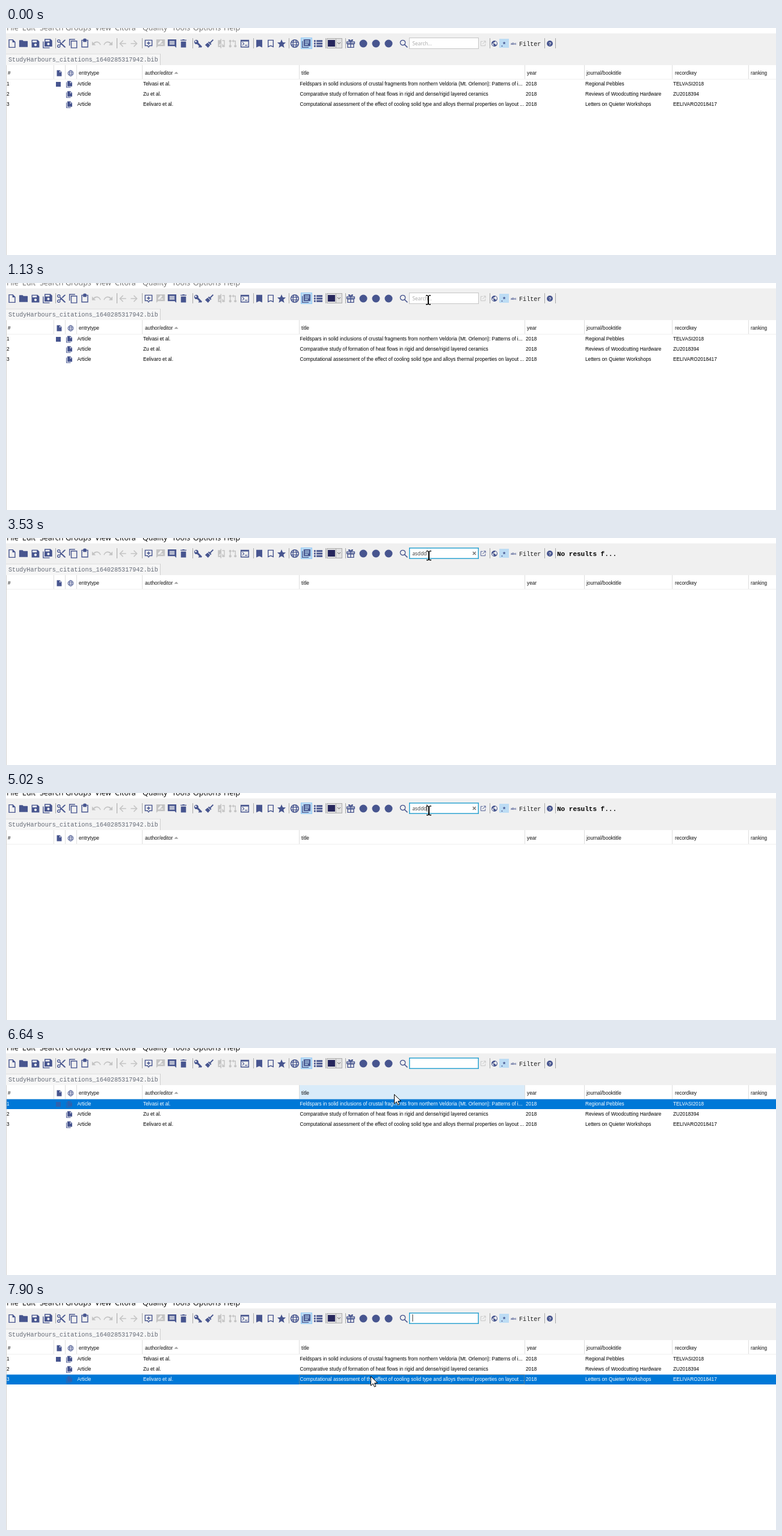
These frames come from a looping animation (1280x379 px, 7990 ms). An HTML page with a canvas:

```html
<!DOCTYPE html>
<html lang="en">
<head>
<meta charset="utf-8">
<title>Reference table search</title>
<style>
html, body { margin: 0; width: 100%; height: 100%; overflow: hidden; background: #fff; }
canvas { display: block; width: 1280px; height: 379px; }
</style>
</head>
<body>
<canvas id="stage" width="1280" height="379"></canvas>
<script>
const ctx = document.getElementById('stage').getContext('2d');
const LOOP = 7990;
const INK = '#47558f', DIM = '#c4c4c4';
const SANS = '8.25px "Liberation Sans", Arial, sans-serif';
const FIELD = '8.3px "Open Sans", sans-serif';
const MENU = '12.5px "Open Sans", sans-serif';
const MONO = '10.12px "Liberation Mono", monospace';

// Icon outlines on a 24 unit grid, filled even-odd
const SHAPES = {
  file: 'M4 2h10l6 6v14H4z M6 4v16h12V9h-5V4z',
  folder: 'M2 5a1 1 0 0 1 1-1h7l2 2h9a1 1 0 0 1 1 1v13H2z',
  save: 'M3 3h14l4 4v14H3z M5 5v4h10V5z M12 12a3 3 0 1 0 .01 0z',
  saveAll: 'M5 1h14l4 4v14H5z M7 3v4h10V3z M14 10a3 3 0 1 0 .01 0z M1 7h2v14h14v2H1z',
  cut: 'M19 3l-6 6 2 2 7-7V3z M6 2a4 4 0 1 0 .01 0z M6 4a2 2 0 1 1-.01 0z M6 14a4 4 0 1 0 .01 0z M6 16a2 2 0 1 1-.01 0z M9 7l13 13v1h-3l-7-7-3 3-1.500-2.500L10 12 7.500 9.500z',
  copy: 'M6 5h15v18H6z M8 7v14h11V7z M2 1h14v2H4v14H2z',
  paste: 'M4 3h4a4 3 0 0 1 8 0h4v18H4z M6 5v14h12V5h-2v3H8V5z',
  undo: 'M13 7C9 7 7 9 5.500 10.500L2 7v9h9l-3.600-3.600C9 11 11 9.500 13 9.500c4 0 7 2.500 8 6l2-.7C21.500 10.500 18 7 13 7z',
  back: 'M20 11H8l5.500-5.500L12 4l-8 8 8 8 1.500-1.500L8 13h12z',
  add: 'M3 3h18v15h-6l-3 4-3-4H3z M5 5v11h5l2 3 2-3h5V5z M11 7h2v3h3v2h-3v3h-2v-3H8v-2h3z',
  edit: 'M2 2h20v16H6l-4 4z M6 14h3l7-7-3-3-7 7z M11 14h7v-2h-5z',
  note: 'M2 2h20v20l-4-4H2z M6 6h12v2H6z M6 9h12v2H6z M6 12h12v2H6z',
  trash: 'M6 7h12v14H6z M5 3h4l1-1h4l1 1h4v2H5z',
  key: 'M22 19l-3 3-2-2-2 2-2-2 2-2-5-5a5 5 0 1 1 3-3z M7 5a2 2 0 1 0 .01 0z',
  broom: 'M20 2l2 2-7 7 2 2-2 2-6-6 2-2 2 2z M8 10l6 6-5 6-7-7z',
  compare: 'M10 1h2v22h-2v-3H4V4h6z M6 17h4v-6z M14 4h6v16h-6v-8l4 5V6h-4z',
  merge: 'M6 3a3 3 0 0 1 1 5.800v6.400a3 3 0 1 1-2 0V8.800A3 3 0 0 1 6 3z M18 15a3 3 0 1 1-.1 0z M17 15V7h-3v3l-4-4 4-4v3h5v10z',
  shell: 'M2 3h20v18H2z M4 7v12h16V7z M6 9l1-1 4 4.500L7 17l-1-1 3-3.500z M12 15h6v2h-6z',
  mark: 'M5 3h14v18l-7-3-7 3z',
  markLine: 'M5 3h14v18l-7-3-7 3z M7 5v13l5-2 5 2V5z',
  star: 'M12 2l3 7 7 .5-5.500 5 2 7.500-6.500-4-6.500 4 2-7.500L2 9.500 9 9z',
  shelf: 'M2 6h2v14h14v2H2z M6 2h16v16H6z M9 5h10v2H9z M9 9h10v2H9z M9 13h7v2H9z',
  list: 'M2 4h4v4H2z M8 4h14v4H8z M2 10h4v4H2z M8 10h14v4H8z M2 16h4v4H2z M8 16h14v4H8z',
  gift: 'M2 7h20v6H2z M4 9v2h7V9z M13 9v2h7V9z M4 13h16v9H4z M6 14v6h5v-6z M13 14v6h5v-6z M12 7C7 7 5 4 7 2.500s5 1 5 3c0-2 3-4.500 5-3s0 4.500-5 4.500z',
  doc: 'M4 2h10l6 6v14H4z M13 4v5h5z',
  docs: 'M6 1h10l6 6v12H6z M15 3v5h5z M2 5h2v16h13v2H2z',
  earth: 'M12 2a10 10 0 1 0 .01 0z M4 10l5 5v5C5 18 3.500 14 4 10z M15 4l-1 3h-3v2H8v3h6v3h3l1 2c3-4 3-10-3-13z',
  globe: 'M12 3a9 9 0 1 0 .01 0z M12 3a4 9 0 1 0 .01 0z M4 9h16 M4 15h16',
  lens: 'M10 4a6 6 0 1 0 .01 0z M14 14l7 7',
  open: 'M11 4H4v16h16v-7 M14 3h7v7 M21 3L10 14'
};
const LINED = ['globe', 'lens', 'open'];
const paths = {};
for (const name in SHAPES) paths[name] = new Path2D(SHAPES[name]);

const TOOLS = [
  ['file', 10], ['folder', 29], ['save', 49], ['saveAll', 69],
  ['cut', 92], ['copy', 112], ['paste', 131], ['undo', 150, 1], ['undo', 170, 1, 1],
  ['back', 194, 1], ['back', 213, 1, 1],
  ['add', 237], ['edit', 257, 1], ['note', 276], ['trash', 295],
  ['key', 319], ['broom', 338], ['compare', 358, 1], ['merge', 377, 1], ['shell', 397],
  ['mark', 421], ['markLine', 440], ['star', 458], ['globe', 480], ['shelf', 499],
  ['list', 519], ['gift', 573], ['lens', 661]
];
const BARS = [82, 184, 226, 310, 411, 470, 531, 564, 804, 895, 913];
const MENUS = [['File', 1], ['Edit', 27], ['Search', 56], ['Groups', 99], ['View', 148],
  ['Citora', 181], ['Quality', 227], ['Tools', 276], ['Options', 311], ['Help', 362]];
const HEADS = [['#', 3], ['entrytype', 121], ['author/editor', 231], ['title', 491],
  ['year', 866], ['journal/booktitle', 965], ['recordkey', 1112], ['ranking', 1238]];
const EDGES = [79, 98, 117, 226, 487, 862, 961, 1107, 1234];
const CELLS = [1, 118.5, 228, 488.5, 864, 963, 1109];
const ROWS = [
  ['1', 'Article', 'Telvasi et al.',
    'Feldspars in solid inclusions of crustal fragments from northern Veldoria (Mt. Orlemon): Patterns of i...',
    '2018', 'Regional Pebbles', 'TELVASI2018'],
  ['2', 'Article', 'Zu et al.',
    'Comparative study of formation of heat flows in rigid and dense/rigid layered ceramics',
    '2018', 'Reviews of Woodcutting Hardware', 'ZU2018394'],
  ['3', 'Article', 'Eelivaro et al.',
    'Computational assessment of the effect of cooling solid type and alloys thermal properties on layout ...',
    '2018', 'Letters on Quieter Workshops', 'EELIVARO2018417']
];

// Pointer: time, x, y (held until the next entry)
const POINTER = [
  [130, 992, 288], [210, 862, 249], [440, 822, 190], [520, 770, 120], [590, 732, 72], [670, 714, 45],
  [980, 708, 38], [1060, 703, 31], [1130, 702, 28], [1290, 703, 29],
  [5250, 704, 31], [5330, 706, 36], [5400, 709, 42], [5480, 711, 49], [5780, 711, 46],
  [6260, 708, 49], [6340, 698, 55], [6410, 682, 61], [6490, 668, 66], [6570, 655, 71], [6640, 645, 77],
  [6720, 630, 115], [6800, 618, 160], [6880, 612, 190],
  [7200, 611, 186], [7280, 610, 174], [7360, 609, 158], [7430, 607, 140], [7510, 606, 128], [7590, 606, 122]
];
const TYPED = [[2220, 'a'], [2450, 'as'], [2680, 'asd'], [2830, 'asdd'], [3060, 'asddd'], [5880, '']];
const CARET = [[1290, 1820], [2220, 3530], [4010, 4470], [5020, 5480], [5880, 6380], [6880, 7380], [7880, LOOP]];

const latest = (keys, t) => keys.filter(k => k[0] <= t).pop();
const during = (t, a, b) => t >= a && t < b;

function box(x, y, w, h, color) {
  ctx.fillStyle = color;
  ctx.fillRect(x, y, w, h);
}

function frame(x, y, w, h, color, line = 1) {
  ctx.strokeStyle = color;
  ctx.lineWidth = line;
  ctx.strokeRect(x + line / 2, y + line / 2, w - line, h - line);
}

function text(str, x, y, font, color) {
  ctx.font = font;
  ctx.fillStyle = color;
  ctx.fillText(str, x, y);
}

function dot(x, y, r, color) {
  ctx.fillStyle = color;
  ctx.beginPath();
  ctx.arc(x, y, r, 0, 7);
  ctx.fill();
}

function icon(name, x, y, size, color = INK, flip = false) {
  const s = size / 24;
  ctx.save();
  ctx.translate(x, y);
  ctx.scale(flip ? -s : s, s);
  ctx.translate(-12, -12);
  ctx.fillStyle = ctx.strokeStyle = color;
  ctx.lineWidth = 2;
  if (LINED.includes(name)) ctx.stroke(paths[name]);
  else ctx.fill(paths[name], 'evenodd');
  ctx.restore();
}

function triangle(x, y, w, h, color) {
  ctx.fillStyle = color;
  ctx.beginPath();
  ctx.moveTo(x - w, y + h);
  ctx.lineTo(x, y);
  ctx.lineTo(x + w, y + h);
  ctx.fill();
}

function drawToolbar(active, empty) {
  box(0, 9, 1280, 53, '#f0f0f0');
  for (const [name, x] of MENUS) text(name, x, 4, MENU, active ? '#000' : '#6e6e6e');
  for (const x of BARS) box(x, 17, 1, 17, '#a6a6a6');

  box(490, 16, 19, 19, '#bcdcf4');
  frame(490, 16, 19, 19, '#90c8f6');
  for (const [name, x, off, flip] of TOOLS) icon(name, x, 26, 17, off ? DIM : INK, flip);

  box(533, 17, 26, 17, '#e1e1e1');
  frame(533, 17, 26, 17, '#adadad');
  box(535, 20, 12, 11, '#26265c');
  box(548, 18, 1, 15, '#adadad');
  ctx.strokeStyle = '#555';
  ctx.lineWidth = 1;
  ctx.beginPath();
  ctx.moveTo(551, 24); ctx.lineTo(553.5, 26.5); ctx.lineTo(556, 24);
  ctx.stroke();
  for (const x of [594, 615, 636]) dot(x, 26, 6.5, INK);

  icon('open', 793, 26, 11, empty ? INK : DIM);
  icon('earth', 812, 26, 12);
  box(820, 18, 16, 15, '#bcdcf4');
  text('.*', 823, 31, 'bold 11px "Liberation Sans", sans-serif', INK);
  text('abc', 839, 28, 'bold 5.5px "Liberation Sans", sans-serif', INK);
  text('Filter', 853, 30, MONO, '#222');
  dot(904, 26, 5, INK);
  text('?', 901.8, 29, 'bold 8px "Liberation Sans", sans-serif', '#f0f0f0');
  if (empty) text('No results f...', 916, 30, 'bold 11px "Liberation Mono", monospace', '#000');

  box(0, 43, 257, 19, '#f6f6f6');
  box(0, 43, 257, 1, '#e0e0e0');
  box(256, 43, 1, 19, '#cfcfcf');
  text('StudyHarbours_citations_1640285317942.bib', 4, 55.5, MONO, '#646a76');
}

function drawSearch(t, active) {
  box(670, 16, 116, 19, '#fff');
  frame(670, 16, 116, 19, active ? '#2ea3d0' : '#c6c6c6', active ? 1.5 : 1);
  if (!active) return text('Search...', 675.5, 28.5, FIELD, '#a8a8a8');

  const typed = (latest(TYPED, t) || [0, ''])[1];
  text(typed, 675.5, 28.5, FIELD, '#333');
  const width = ctx.measureText(typed).width;
  if (CARET.some(([a, b]) => during(t, a, b))) box(675.5 + width, 19, 1, 12, '#333');
  if (typed) {
    ctx.strokeStyle = '#777';
    ctx.lineWidth = 1.5;
    ctx.beginPath();
    ctx.moveTo(776, 23); ctx.lineTo(781, 28);
    ctx.moveTo(781, 23); ctx.lineTo(776, 28);
    ctx.stroke();
  }
}

function drawTable(hover, empty, picked) {
  if (hover) box(487, 62, 375, 23, '#d9ebf9');
  for (const x of EDGES) box(x, 62, 1, 23, '#dedede');
  box(0, 85, 1280, 1, '#f0f0f0');
  for (const [name, x] of HEADS) text(name, x, 78, SANS, '#111');
  icon('doc', 88.5, 75.5, 12);
  icon('globe', 107.5, 75.5, 12);
  triangle(283, 73, 3.5, 3.5, '#a0a0a0');

  if (!empty) ROWS.forEach((row, i) => {
    const y = 85 + i * 17, on = picked === i;
    if (on) box(0, y + .5, 1280, 16.5, '#0078d7');
    row.forEach((cell, k) => text(cell, CELLS[k], y + 11, SANS, on ? '#fff' : '#000'));
    const ink = on ? '#2f62ae' : INK;
    if (i === 0) box(83, y + 5, 8, 8, ink);
    icon('docs', 105, y + 9, 12, ink);
    if (on && i === 2) {
      ctx.setLineDash([1, 1]);
      frame(487, y, 375, 17, '#b98a5a');
      ctx.setLineDash([]);
    }
  });
  box(0, 62, 1, 317, '#cfcfcf');
}

function drawPointer(x, y) {
  if (y > 16 && y < 34) {
    box(x - 1, y - 7, 2, 15, '#000');
    for (const dy of [-8, 7]) {
      box(x - 4, y + dy, 3, 1.5, '#000');
      box(x + 1, y + dy, 3, 1.5, '#000');
    }
    return;
  }
  ctx.save();
  ctx.translate(x + .5, y + .5);
  ctx.beginPath();
  ctx.moveTo(0, 0);
  ctx.lineTo(0, 15.5);
  ctx.lineTo(3.6, 12.2);
  ctx.lineTo(6, 17.5);
  ctx.lineTo(8.4, 16.5);
  ctx.lineTo(6.1, 11.3);
  ctx.lineTo(11, 11);
  ctx.closePath();
  ctx.fillStyle = '#fff';
  ctx.fill();
  ctx.strokeStyle = '#000';
  ctx.lineWidth = 1;
  ctx.stroke();
  ctx.restore();
}

function draw(t) {
  const pos = latest(POINTER, t);
  const active = t >= 1290;
  const empty = during(t, 3460, 5780);
  const picked = t >= 7670 ? 2 : t >= 5780 ? 0 : -1;
  const hover = pos && pos[1] > 487 && pos[1] < 862 && pos[2] >= 62 && pos[2] < 85;
  box(0, 0, 1280, 379, '#fff');
  drawToolbar(active, empty);
  drawSearch(t, active);
  drawTable(hover, empty, picked);
  if (pos) drawPointer(pos[1], pos[2]);
}

const start = performance.now();
function tick() {
  draw((performance.now() - start) % LOOP);
  requestAnimationFrame(tick);
}
tick();
</script>
</body>
</html>
```
